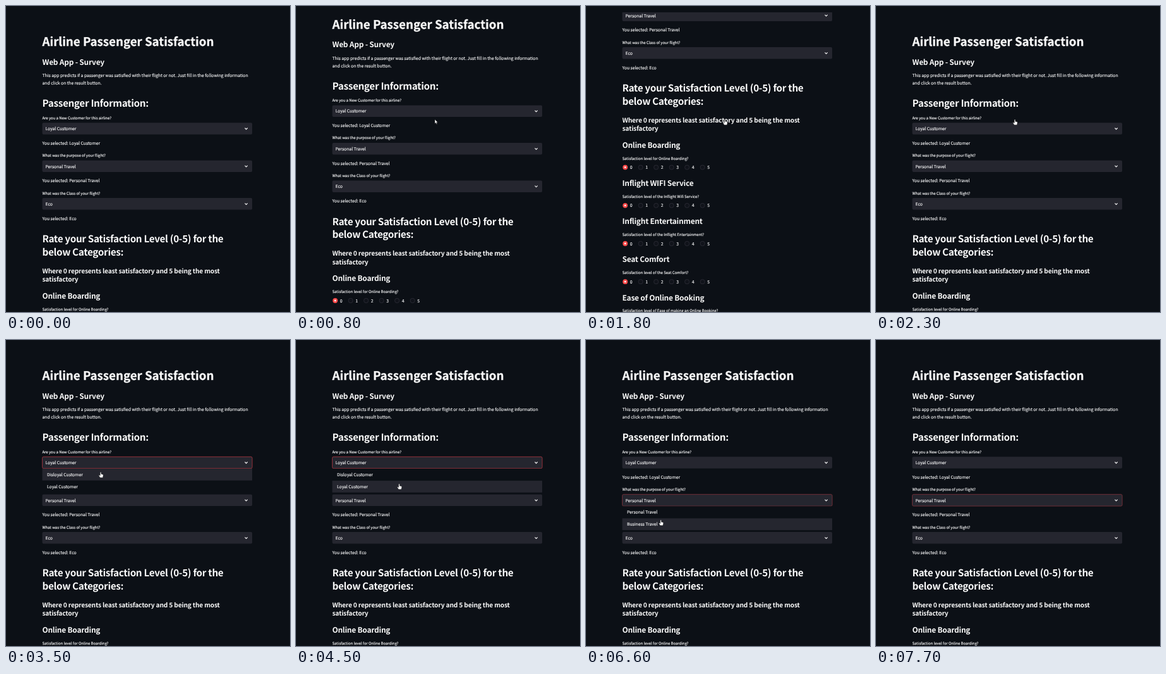
Animation, 450 px wide and 483 px high, one loop 8 s. Source, as an HTML page:

```html
<!DOCTYPE html>
<html lang="en">
<head>
<meta charset="utf-8">
<title>Passenger survey</title>
<style>
  html, body { margin: 0; width: 100%; height: 100%; overflow: hidden; background: #0c1016; }
  svg { display: block; }
  text {
    font-family: "Noto Sans CJK JP", "Noto Sans CJK SC", "Noto Sans CJK", "Open Sans", sans-serif;
    font-size: 6.77px; fill: #f6f6f7; stroke: #f6f6f7; stroke-width: .15px;
    white-space: pre; text-rendering: geometricPrecision;
  }
  .h1, .h2, .h3, .h4 { font-weight: 700; fill: #fafafa; }
  .h2, .h3, .h4 { letter-spacing: -0.015em; stroke: none; }
  .h1 { font-size: 18.68px; stroke-width: .3px; }
  .h2 { font-size: 15.25px; letter-spacing: -0.021em; }
  .h3 { font-size: 11.85px; }
  .h4 { font-size: 10.16px; }
  .label { font-size: 5.94px; }
</style>
</head>
<body>
<svg width="450" height="483" viewBox="0 0 450 483">
  <defs><clipPath id="view"><rect y="10" width="450" height="473"/></clipPath></defs>
  <g clip-path="url(#view)"><g id="page"></g></g>
  <g id="cursor">
    <path id="arrow" d="M0 0V6.6L1.6 5.2L2.7 7.6L3.7 7.1L2.6 4.8H4.6Z" fill="#fff" stroke="#111" stroke-width=".4"/>
    <path id="hand" d="M-.8 .7Q0 -.5 .8 .7V3.2L3.4 3.8Q4.3 4.1 4.1 5.2L3.4 8.8H-.9L-3 5.6Q-3.1 4.4 -1.9 4.9L-.8 5.8Z" fill="#fff" stroke="#111" stroke-width=".4"/>
  </g>
</svg>
<script>
const LOOP = 8000, STEP = 100;
const $ = id => document.getElementById(id);
const page = $('page');

const text = (x, y, s, cls = '') => `<text x="${x}" y="${y}" class="${cls}">${s}</text>`;
const rect = (x, y, w, h, extra) => `<rect x="${x}" y="${y}" width="${w}" height="${h}" ${extra}/>`;

const LEFT = 57.5, BOX_H = 18.4, ROW_H = 19;
const selects = [
  { ask: 'Are you a New Customer for this airline?', value: 'Loyal Customer',
    options: ['Disloyal Customer', 'Loyal Customer'], focus: [2700, 5600], open: [2700, 4900], ring: '#b03641' },
  { ask: 'What was the purpose of your flight?', value: 'Personal Travel',
    options: ['Personal Travel', 'Business Travel'], focus: [5600, LOOP], open: [5600, 7100], ring: '#85343b' },
  { ask: 'What was the Class of your flight?', value: 'Eco' }
];
selects.forEach((s, i) => s.top = 184.3 + i * 59.4);

const ratings = [
  ['Online Boarding', 'for Online Boarding?'],
  ['Inflight WIFI Service', 'of the Inflight Wifi Service?'],
  ['Inflight Entertainment', 'of the Inflight Entertainment?'],
  ['Seat Comfort', 'of the Seat Comfort?'],
  ['Ease of Online Booking', 'of Ease of making an Online Booking?']
];

function selectBox({ ask, value, top }, i) {
  return text(LEFT, top - 5.6, ask, 'label') +
    rect(LEFT, top, 332.6, BOX_H, `id="box${i}" rx="2" fill="#25262f" stroke-width=".8"`) +
    text(62.5, top + 11.8, value) +
    `<path d="M378.5 ${top + 8.2}l2.1 2.1l2.1 -2.1" fill="none" stroke="#fafafa" stroke-width="1.1"/>` +
    text(LEFT, top + 34.7, 'You selected: ' + value);
}

function radio(i, y) {
  const x = 62.1 + i * 24.5;
  const [outer, inner, r] = i ? ['#262730', '#10131a', 2.9] : ['#ff4b4b', '#fafafa', 1.4];
  return `<circle cx="${x}" cy="${y}" r="3.9" fill="${outer}"/>` +
    `<circle cx="${x}" cy="${y}" r="${r}" fill="${inner}"/>` +
    text(x + 7.6, y + 2.6, i);
}

function rating([title, tail], i) {
  const y = 461.8 + i * 60.2;
  return text(LEFT, y, title, 'h3') +
    text(LEFT, y + 18.7, 'Satisfaction level ' + tail, 'label') +
    [0, 1, 2, 3, 4, 5].map(n => radio(n, y + 30.8)).join('');
}

function menu({ options, top }, i) {
  const y = top + BOX_H;
  return `<g id="menu${i}">` + rect(57, y + .4, 333.5, ROW_H * 2, 'fill="#0c1016"') +
    rect(LEFT, y + .4, 332.6, ROW_H - .4, `id="hover${i}" fill="#25262f"`) +
    options.map((o, n) => text(65, y + 12.3 + n * ROW_H, o)).join('') + '</g>';
}

page.innerHTML =
  text(LEFT, 63.2, 'Airline Passenger Satisfaction', 'h1') +
  text(LEFT, 92.5, 'Web App - Survey', 'h3') +
  text(LEFT, 112.3, 'This app predicts if a passenger was satisfied with their flight or not. Just fill in the following information') +
  text(LEFT, 124.4, 'and click on the result button.') +
  text(LEFT, 159.3, 'Passenger Information:', 'h2') +
  selects.map(selectBox).join('') +
  text(LEFT, 373.2, 'Rate your Satisfaction Level (0-5) for the', 'h2') +
  text(LEFT, 393.6, 'below Categories:', 'h2') +
  text(LEFT, 421.8, 'Where 0 represents least satisfactory and 5 being the most', 'h4') +
  text(LEFT, 435.4, 'satisfactory', 'h4') +
  ratings.map(rating).join('') +
  selects.slice(0, 2).map(menu).join('');

// Each key is a time followed by its values.
const scrollKeys = [
  [700, 0], [800, 27.6], [900, 85], [1000, 150], [1100, 208], [1200, 250], [1300, 268],
  [1700, 268], [1800, 238], [1900, 165], [2000, 92], [2100, 38], [2200, 9], [2300, 0]
];
const cursorKeys = [
  [400, 220, 179], [2600, 220, 179], [2900, 200, 190], [3300, 150, 208], [3800, 150, 209],
  [4400, 163.5, 227], [4900, 163.5, 227], [5300, 135, 250], [5600, 122, 252],
  [6200, 119, 268], [6500, 118.5, 284], [6700, 118.5, 284], [7000, 116, 268], [7500, 112, 250]
];

function at(keys, t) {
  const n = keys.findIndex(k => k[0] > t);
  if (n < 1) return keys.at(n).slice(1);
  const a = keys[n - 1], b = keys[n], p = (t - a[0]) / (b[0] - a[0]);
  return a.slice(1).map((v, i) => v + (b[i + 1] - v) * p);
}

const within = (t, [from, to]) => t >= from && t < to;
const show = (id, on) => $(id).setAttribute('visibility', on ? 'visible' : 'hidden');

function draw(t) {
  const [scroll] = at(scrollKeys, t);
  const [x, y] = at(cursorKeys, t);
  page.setAttribute('transform', `translate(0 ${-scroll})`);
  $('cursor').setAttribute('transform', `translate(${x} ${y})`);
  const pointer = within(t, [400, 7700]), isHand = t >= 1300;
  show('arrow', pointer && !isHand);
  show('hand', pointer && isHand);

  selects.slice(0, 2).forEach((s, i) => {
    $('box' + i).setAttribute('stroke', within(t, s.focus) ? s.ring : 'none');
    show('menu' + i, within(t, s.open));
    const start = s.top + BOX_H;
    const row = y < start ? s.options.indexOf(s.value) : y < start + ROW_H ? 0 : 1;
    $('hover' + i).setAttribute('y', start + .4 + row * ROW_H);
  });
}

function tick(now) {
  draw(Math.floor((now % LOOP) / STEP) * STEP);
  requestAnimationFrame(tick);
}
draw(0);
requestAnimationFrame(tick);
</script>
</body>
</html>
```
